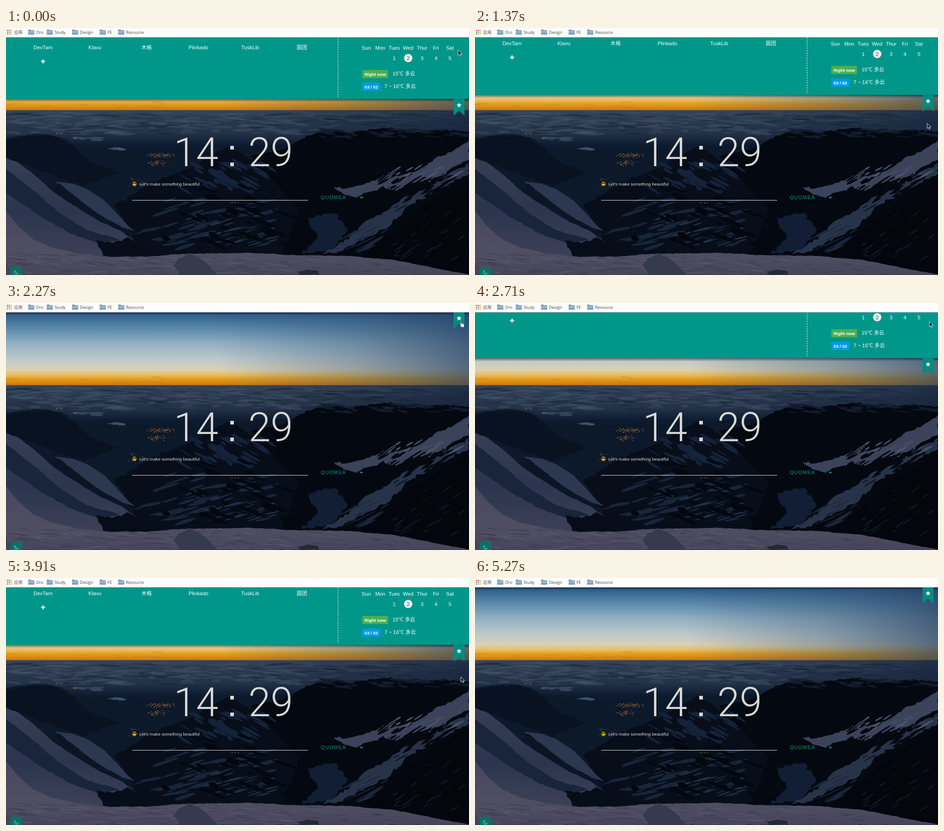
Animation of 1024x547 px, one loop 5.86 s. Source, as an HTML page with a canvas:

```html
<!DOCTYPE html>
<html lang="en">
<head>
<meta charset="utf-8">
<title>Start page</title>
<style>
  html, body { margin: 0; width: 100%; height: 100%; overflow: hidden; background: #060b16; }
  canvas, svg { position: absolute; left: 0; top: 0; width: 1024px; height: 547px; }
  text { font: 11.4px "Liberation Sans", "Noto Sans CJK SC", "Noto Sans CJK", sans-serif; fill: #fff; }
  .bar text { font: 9.2px "Open Sans", "Noto Sans CJK SC", "Noto Sans CJK", sans-serif; fill: #444; }
  .title { font: 300 20px Roboto, "Liberation Sans", sans-serif; }
  .badge { font-size: 9.8px; font-weight: 700; }
  .clock { font: 300 89px Roboto, "Liberation Sans", sans-serif; fill: #d9d9d6; }
  .motto { font-size: 9.7px; fill: #d8d8d8; }
  .engine { font-size: 11.2px; letter-spacing: 1.1px; fill: #009688; }
  .mid { text-anchor: middle; }
  .line { fill: none; stroke: #fff; stroke-width: 1.3; }
</style>
</head>
<body>
<canvas id="scene" width="1024" height="547"></canvas>
<svg viewBox="0 0 1024 547">
  <defs>
    <clipPath id="page"><rect y="21" width="1024" height="526"/></clipPath>
    <linearGradient id="shade" x2="0" y2="1">
      <stop stop-opacity=".5"/><stop offset="1" stop-opacity="0"/>
    </linearGradient>
    <linearGradient id="folder" x2="0" y2="1">
      <stop stop-color="#a9c3dd"/><stop offset="1" stop-color="#7296bb"/>
    </linearGradient>
    <g id="dir">
      <path d="M0 5q0-1.500 1.500-1.500h3.500l1.500 1.500h6q1 0 1 1v8.500h-13.500z" fill="#6b8fb4"/>
      <rect y="6.500" width="13.500" height="8" rx=".8" fill="url(#folder)"/>
    </g>
  </defs>

  <text class="clock" x="371" y="306">14</text>
  <g fill="#d9d9d6"><rect x="496" y="261" width="8" height="8"/><rect x="496" y="298" width="8" height="8"/></g>
  <text class="clock" x="536" y="306">29</text>

  <circle cx="284" cy="345" r="4.500" fill="#f2b924"/>
  <path d="M279.500 342.500h9l-.6 2.300q-2 1.500-3.300-.8h-1q-1.300 2.300-3.300.8z" fill="#222"/>
  <path d="M282 347.300q2 1.300 4 0" fill="none" stroke="#7a4a12" stroke-width=".8"/>
  <text class="motto" x="295" y="349">Let's make something beautiful</text>
  <path d="M279 381.500H668" stroke="#e4e4e4"/>
  <text class="engine" x="696" y="379">QUOMEA</text>
  <path d="M782 374h8l-4 4z" fill="#009688"/>

  <rect x="10" y="529" width="25" height="20" rx="2" fill="#00796b" opacity=".85"/>
  <path d="M21 537a4.500 4.500 0 1 0 6 6a5 5 0 0 1-6-6z" fill="none" stroke="#a9cfca"/>

  <g clip-path="url(#page)">
    <g id="panel">
      <rect y="203" width="1024" height="7" fill="url(#shade)"/>
      <rect y="15" width="1024" height="188" fill="#00978a"/>
      <path d="M990 202h24v38l-12-11-12 11z" fill="#008c80"/>
      <path id="star" fill="#fff"/>

      <path class="line" d="M31 42h13v16l-6.500-6-6.500 6z"/>
      <text class="title" x="55" y="57">Nice to meet U</text>
      <g id="links" class="mid"></g>
      <path d="M77.500 120h9M82 115.500v9" stroke="#fff" stroke-width="2.400"/>
      <path d="M734.500 21V199" stroke="#fff" stroke-dasharray="3 2.500"/>

      <path class="line" d="M761.500 46h14v12.500h-14zM765 43v4M772 43v4M761.500 49h14"/>
      <text class="title" x="786" y="58">2016 Mar</text>
      <path d="M928.500 58q-3.500-5-3.500-7a3.500 3.500 0 0 1 7 0q0 2-3.500 7z" fill="#fff"/>
      <circle cx="928.500" cy="51" r="1.200" fill="#00978a"/>
      <text x="941" y="57">Shanghai</text>
      <circle cx="889.500" cy="112.500" r="9.300" fill="#eee"/>
      <g id="days" class="mid"></g>

      <rect x="788" y="139" width="57" height="18" rx="1" fill="#4caf50"/>
      <text class="badge" x="793" y="151.500">Right now</text>
      <text x="855" y="151">15℃ 多云</text>
      <rect x="788" y="167" width="40" height="18" rx="1" fill="#039be5"/>
      <text class="badge" x="793" y="179.500">03 / 02</text>
      <text x="837" y="179">7 ~ 16℃ 多云</text>
    </g>
  </g>

  <g class="bar">
    <rect width="1024" height="20.500" fill="#fdfdfd"/>
    <path d="M0 20.500H1024" stroke="#b5b5b5"/>
    <g id="apps"></g>
    <text x="18" y="13">应用</text>
    <g id="folders"></g>
  </g>

  <g id="cursor">
    <path id="arrow" d="M0 0V11.500L2.700 9 4.600 13.200 6.500 12.300 4.700 8.300H8.300Z" fill="#111" stroke="#fff" stroke-width=".9"/>
    <path id="hand" d="M-1 1q1.500-1.700 2.600.3l1 3.400 1.500-.7 1.400.8 1.500-.2 1.200 1.300.7 3.300-1 3.800h-5.500l-4.200-4.600q-.3-1.600 1.600-.8l.7.500z" fill="#fff" stroke="#111" stroke-width=".9"/>
  </g>
</svg>
<script>
const byId = id => document.getElementById(id);

// Landscape
const ctx = byId("scene").getContext("2d");
let seed = 11;
const rand = () => (seed = seed * 16807 % 2147483647) / 2147483647;
const spread = (mid, size) => mid + (rand() + rand() - 1) * size;

function gradient(x0, y0, x1, y1, stops) {
  const g = ctx.createLinearGradient(x0, y0, x1, y1);
  stops.forEach(([at, color]) => g.addColorStop(at, color));
  return g;
}

// Filled outline whose edges are broken up by small random offsets.
function land(fill, outline, rough = 0) {
  const pts = outline.split(" ").map(p => p.split(",").map(Number));
  ctx.beginPath();
  pts.forEach(([x, y], i) => {
    const [nx, ny] = pts[(i + 1) % pts.length];
    const n = rough ? Math.ceil(Math.hypot(nx - x, ny - y) / 7) : 1;
    for (let k = 0; k < n; k++) {
      const off = k ? rough : 0;
      ctx.lineTo(spread(x + (nx - x) * k / n, off), spread(y + (ny - y) * k / n, off));
    }
  });
  ctx.fillStyle = fill;
  ctx.fill();
}

function streaks(count, color, [x, y, w, h], slope, length, thick) {
  ctx.fillStyle = color;
  for (let i = 0; i < count; i++) {
    ctx.beginPath();
    ctx.ellipse(x + rand() * w, y + rand() * h, length * (.4 + rand()), thick * (.4 + rand()),
      Math.atan(slope) + (rand() - .5) * .2, 0, 7);
    ctx.fill();
  }
}

function lights(count, x, y, w, h) {
  for (let i = 0; i < count; i++) {
    ctx.fillStyle = rand() < .6 ? "#b87835" : "#70503a";
    ctx.fillRect(spread(x, w), spread(y, h), 1.4, 1.2);
  }
}

function drawScene() {
  ctx.fillStyle = gradient(0, 20, 0, 184, [[0, "#285786"], [.2, "#5685a9"], [.42, "#91b0c2"],
    [.64, "#bdc9ca"], [.78, "#dbd1b4"], [.85, "#e9bd62"], [.9, "#e5a01b"], [.96, "#d7850f"], [1, "#b56a35"]]);
  ctx.fillRect(0, 20, 1024, 164);
  ctx.fillStyle = gradient(480, 184, 1060, 60, [[0, "#304f7000"], [.5, "#304f7060"], [1, "#253f62d0"]]);
  ctx.fillRect(0, 20, 1024, 164);
  streaks(10, "#b8793570", [0, 164, 420, 12], 0, 20, 1);

  ctx.fillStyle = gradient(0, 182, 0, 260, [[0, "#394656"], [.2, "#2b3b50"], [.65, "#233247"], [1, "#0d1b30"]]);
  ctx.fillRect(0, 182, 1024, 365);
  streaks(150, "#45556870", [0, 185, 1024, 25], 0, 24, 1.4);
  streaks(100, "#43526570", [0, 205, 720, 30], .02, 20, 2.8);
  streaks(90, "#17253a90", [0, 190, 1024, 45], 0, 26, 1.6);
  ctx.fillStyle = gradient(560, 0, 1024, 0, [[0, "#14233a00"], [1, "#14233aa0"]]);
  ctx.fillRect(0, 182, 1024, 60);

  land("#0c192b", "0,243 35,238 75,235 123,242 160,265 220,263 310,270 380,262 455,274 540,260 690,255 690,547 0,547", 2);
  streaks(12, "#35455a", [155, 242, 60, 7], .05, 13, 1.6);
  streaks(4, "#405066", [236, 265, 25, 4], 0, 10, 2);
  land("#081220", "0,250 40,240 105,240 155,267 190,300 250,320 170,350 60,310 0,285", 3);
  land("#070e1a", "240,392 330,340 400,312 450,285 490,262 535,285 590,320 660,365 710,500 300,505 270,440", 4);
  land("#040810", "540,285 615,268 670,238 705,227 765,231 850,220 905,232 955,225 1024,229 1024,547 590,547 650,400", 3);
  streaks(45, "#121d2d", [690, 225, 330, 18], .1, 15, 1.8);

  streaks(46, "#14233a", [390, 300, 190, 60], .55, 17, 3);
  streaks(40, "#17253a", [285, 380, 300, 105], -.25, 24, 3);
  streaks(22, "#23314a", [400, 415, 190, 65], -.3, 22, 1.5);
  streaks(35, "#03070f", [300, 350, 330, 135], .35, 22, 4);
  land("#111e33", "665,420 730,410 755,450 720,490 655,500 690,465", 5);

  // Right ridge
  land("#3a4359", "725,353 765,353 805,342 835,326 875,326 920,312 950,288 985,275 1024,249 1024,292 985,310 955,330 925,345 890,347 865,362 835,350 815,360 775,376 745,367", 4);
  land("#273349", "1024,298 985,318 925,358 880,375 833,410 790,432 760,462 700,500 735,495 800,463 850,438 892,393 960,355 1024,323", 5);
  streaks(50, "#05080f", [810, 325, 200, 60], -.6, 17, 2.4);
  streaks(25, "#4b5268", [835, 305, 170, 32], -.55, 13, 1.4);
  streaks(28, "#1c273a", [750, 445, 170, 50], -.5, 20, 1.8);
  land("#03060c", "1024,335 960,370 900,405 855,455 790,500 900,522 1024,547", 4);
  streaks(24, "#111a29", [860, 395, 150, 115], -.65, 13, 1.2);

  // Left slopes
  land("#2c3850", "108,340 148,345 180,357 218,382 243,408 270,438 285,450 245,438 195,405 155,375");
  land("#0a1525", "118,344 150,370 195,408 237,430 282,455 275,470 150,410 100,360", 2);
  land(gradient(0, 290, 0, 505, [[0, "#343f55"], [.55, "#2b364e"], [1, "#3d4057"]]),
    "0,288 25,297 60,323 105,363 150,393 205,427 255,450 280,468 240,475 230,507 0,510", 1);
  land("#18253b", "0,312 55,355 110,403 180,448 255,469 200,476 145,456 80,420 0,365", 2);
  land("#060c18", "200,470 235,476 270,464 330,505 218,507", 4);

  // Foreground
  land(gradient(0, 420, 0, 547, [[0, "#4a485f"], [.6, "#504e63"], [1, "#454559"]]),
    "0,405 25,437 60,468 100,486 155,498 235,507 320,506 390,500 540,498 640,503 760,505 860,514 950,532 1024,546 1024,547 0,547", 1);
  streaks(100, "#62607370", [0, 507, 720, 40], .06, 20, 1);
  streaks(75, "#37394d90", [0, 500, 870, 45], .1, 18, 1.1);
  land("#353a4c", "370,525 382,510 405,500 428,509 447,524 465,547 385,547", 2);
  land("#24293a", "645,541 668,535 690,538 692,546 655,547", 1);

  lights(95, 340, 281, 38, 6);
  lights(55, 333, 299, 27, 8);
  lights(22, 288, 342, 25, 14);
  lights(12, 117, 233, 13, 2);
  lights(7, 153, 244, 7, 3);
  lights(8, 505, 387, 18, 2);
}

// Labels and icons
function label(parent, x, y, content, fill) {
  const el = document.createElementNS("http://www.w3.org/2000/svg", "text");
  el.setAttribute("x", x);
  el.setAttribute("y", y);
  if (fill) el.style.fill = fill;
  el.textContent = content;
  byId(parent).append(el);
}

["DevTarn", "Klavu", "木格", "Plinkado", "TuskLib", "圆团"]
  .forEach((name, i) => label("links", 82 + i * 114.5, 93, name));
["Sun", "Mon", "Tues", "Wed", "Thur", "Fri", "Sat"].forEach((day, i) => {
  const x = 797 + i * 30.8;
  label("days", x, 94, day);
  if (i > 1) label("days", x, 116.5, i - 1, i === 3 ? "#00695f" : "");
});
[[49, "Oro"], [90, "Study"], [146, "Design"], [207, "FE"], [248, "Resource"]].forEach(([x, name]) => {
  byId("folders").insertAdjacentHTML("beforeend", `<use href="#dir" x="${x}"/>`);
  label("folders", x + 17.5, 13, name);
});
byId("apps").innerHTML = ["#e34a3b", "#e34a3b", "#f0a52c", "#4a9f55", "#4a84d8", "#f0a52c", "#4a9f55", "#f0a52c", "#f0a52c"]
  .map((c, i) => `<rect x="${2 + i % 3 * 4}" y="${4 + Math.floor(i / 3) * 4}" width="2.6" height="2.6" fill="${c}"/>`).join("");
byId("star").setAttribute("d", "M" + Array.from({ length: 10 }, (_, i) => {
  const r = i % 2 ? 2.6 : 5.8, a = i * Math.PI / 5;
  return `${(1002 + r * Math.sin(a)).toFixed(2)} ${(217 - r * Math.cos(a)).toFixed(2)}`;
}).join("L") + "Z");

// Motion: [start ms, values held until the next row]
const LOOP = 5860;
const panelSteps = [[0, -46], [150, -9], [300, 0], [1370, -55], [1520, -154], [1670, -183],
  [2560, -174], [2710, -81], [2860, -19], [3010, 0], [3910, -55], [4060, -154], [4230, -183]];
const cursorSteps = [[0, 1000, 49], [450, 1000, 76], [610, 1000, 142], [770, 1000, 196], [920, 1000, 211],
  [1820, 1001, 185], [1970, 1003, 116], [2120, 1004, 59], [2270, 1005, 41],
  [3010, 1005, 66], [3160, 1006, 135], [3310, 1006, 199], [3460, 1006, 219],
  [4530, 1005, 243], [4680, 1003, 305], [4830, 1000, 380], [4980, 997, 455], [5120, 994, 520], [5270, 992, 570]];
const valueAt = (steps, t) => steps.findLast(step => step[0] <= t);

function render() {
  const t = performance.now() % LOOP;
  const [, dy] = valueAt(panelSteps, t);
  const [, x, y] = valueAt(cursorSteps, t);
  const overRibbon = y >= 203 + dy && y <= 240 + dy;
  byId("panel").setAttribute("transform", `translate(0 ${dy})`);
  byId("cursor").setAttribute("transform", `translate(${x} ${y})`);
  byId("hand").style.display = overRibbon ? "" : "none";
  byId("arrow").style.display = overRibbon ? "none" : "";
  requestAnimationFrame(render);
}

drawScene();
render();
</script>
</body>
</html>
```
